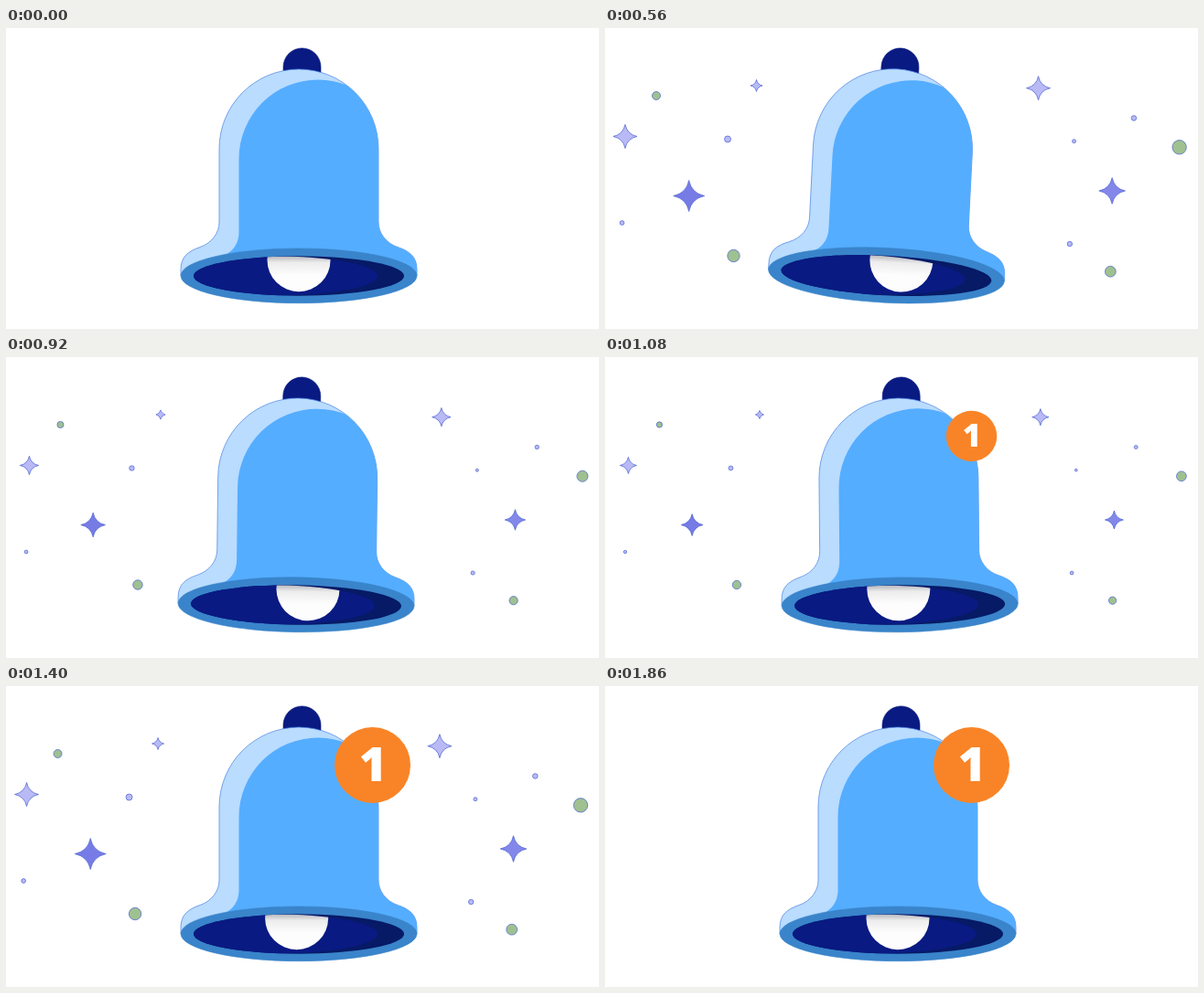
An HTML page that plays this animation: 648 by 329 pixels, repeating every 2000 ms.

```html
<!DOCTYPE html>
<html lang="en">
<head>
<meta charset="utf-8">
<title>Notification bell</title>
<style>
  html, body { margin: 0; width: 100%; height: 100%; overflow: hidden; background: #fff; }
  svg { display: block; width: 100vw; height: 100vh; }
  text { font: 800 52px "Open Sans", "Noto Sans", sans-serif; text-anchor: middle; fill: #fff; }
</style>
</head>
<body>
<svg id="stage" viewBox="0 0 648 329">
  <defs>
    <path id="body" d="M233 132A87 87 0 0 1 407 132V212C407 224 415 235 428 239.5C441 244 449 250 449 264V271H191V264C191 250 199 244 212 239.5C225 235 233 224 233 212Z"/>
    <ellipse id="mouth" cx="320" cy="271" rx="115" ry="21.7"/>
    <clipPath id="inBody"><use href="#body"/></clipPath>
    <clipPath id="inMouth"><use href="#mouth"/></clipPath>
    <clipPath id="inLight"><use href="#mouth" x="-29"/><rect x="320" y="271" width="90" height="30"/></clipPath>
    <linearGradient id="shade" gradientUnits="userSpaceOnUse" x1="0" y1="249" x2="0" y2="270">
      <stop stop-color="#b4b4ba"/><stop offset=".35" stop-color="#ececec"/><stop offset="1" stop-color="#fdfdfd"/>
    </linearGradient>
    <path id="star" d="M0-1Q.17-.17 1 0Q.17 .17 0 1Q-.17 .17-1 0Q-.17-.17 0-1Z"/>
    <circle id="dot" r="1"/>
  </defs>
  <g id="sparks" stroke="#4a62d0" stroke-opacity=".9"></g>
  <g id="bell">
    <path d="M303 50V42.5A20.5 20.5 0 0 1 344 42.5V50Z" fill="#091a82" stroke="#091a82" stroke-width=".6"/>
    <use href="#body" fill="#b9dcff" stroke="#4a80e0" stroke-width=".7"/>
    <path clip-path="url(#inBody)" fill="#55adff" d="M254.5 143A86.5 86.5 0 0 1 427.5 143L460 200V300H238V249Q254 241 254.5 224Z"/>
    <ellipse cx="320" cy="270.8" rx="129" ry="29.9" fill="#3984ca" stroke="#3984ca" stroke-width=".6"/>
    <use href="#mouth" fill="#061a66"/>
    <g clip-path="url(#inMouth)">
      <use href="#mouth" x="-29" fill="#091a82"/>
      <g clip-path="url(#inLight)">
        <circle id="clapper" cx="320" cy="253.7" r="34.5" fill="url(#shade)"/>
      </g>
    </g>
  </g>
  <g id="badge">
    <circle cx="400.5" cy="86.5" r="41.5" fill="#f98427"/>
    <text x="401" y="104.3">1</text>
  </g>
</svg>
<script>
const $ = id => document.getElementById(id);
const LOOP = 2000, STEP = 20, RING = 200;
const GREEN = '#9fc190', LIGHT = '#b9baf5', STRONG = '#777be6', SOFT = '#8487ea';

// shape, x, y, radius, colour
const sparks = [
  ['dot', 55.2, 74, 4.5, GREEN], ['star', 164.7, 63, 6.5, LIGHT],
  ['star', 21.2, 118.5, 13, LIGHT], ['dot', 133.2, 121.5, 3.5, LIGHT],
  ['star', 90.9, 183.5, 17, STRONG], ['dot', 17.8, 213, 2.4, LIGHT],
  ['dot', 139.7, 249, 6.7, GREEN],
  ['star', 473, 65.7, 13, LIGHT], ['dot', 577.4, 98.5, 2.8, LIGHT],
  ['dot', 512, 123.7, 2, LIGHT], ['dot', 627.1, 130.3, 7.7, GREEN],
  ['star', 553.6, 178, 14.3, SOFT], ['dot', 507.3, 236, 2.7, LIGHT],
  ['dot', 551.8, 266.2, 5.9, GREEN]
].map(([shape, x, y, r, fill]) => {
  const el = document.createElementNS('http://www.w3.org/2000/svg', 'use');
  el.setAttribute('href', '#' + shape);
  el.setAttribute('fill', fill);
  $('sparks').append(el);
  return { el, x, y, r, drift: x < 324 ? 4.4 : 2.9 };
});

const linear = u => u;
const smooth = u => u * u * (3 - 2 * u);
const easeOut = u => 1 - (1 - u) ** 3;

// keys: [time, value] pairs in order of time
function track(keys, t, ease = linear) {
  if (t <= keys[0][0]) return keys[0][1];
  for (let i = 1; i < keys.length; i++) {
    const [a, from] = keys[i - 1], [b, to] = keys[i];
    if (t < b) return from + (to - from) * ease((t - a) / (b - a));
  }
  return keys[keys.length - 1][1];
}

const swing = [[0, 4], [320, 3.73], [560, 3.04], [920, 1.18], [1240, .49], [1600, 0]];
const knock = [[0, 0], [100, 21], [320, 22.8], [560, 23.3], [920, 14], [1240, 8.5], [1600, 0]];
const twinkle = [[0, 0], [460, 1], [620, 1], [1080, .7], [1400, 1], [1860, 0]];
const pop = [[1000, 0], [1260, 1]];

const place = (el, value) => el.setAttribute('transform', value);

function draw(t) {
  const phase = 2 * Math.PI * t / RING;
  const angle = -track(swing, t) * Math.sin(phase);
  const shift = -track(knock, t) * Math.sin(phase + Math.PI / 6);
  place($('bell'), `rotate(${angle} 323 22)`);
  place($('clapper'), `translate(${shift} 0)`);

  const size = track(twinkle, t, smooth);
  const sway = -Math.cos(2 * Math.PI * t / LOOP);
  $('sparks').style.display = size > 0 ? '' : 'none';
  for (const { el, x, y, r, drift } of sparks) {
    const s = Math.max(r * size, .01);
    place(el, `translate(${x + drift * sway} ${y}) scale(${s})`);
    el.setAttribute('stroke-width', .8 / s);
  }

  const grow = track(pop, t, easeOut);
  $('badge').style.display = grow > 0 ? '' : 'none';
  place($('badge'), `translate(400.5 86.5) scale(${grow}) translate(-400.5 -86.5)`);
}

const start = performance.now();
function tick() {
  const t = (performance.now() - start) % LOOP;
  draw(t < 40 ? 0 : t - t % STEP);
  requestAnimationFrame(tick);
}
tick();
</script>
</body>
</html>
```
